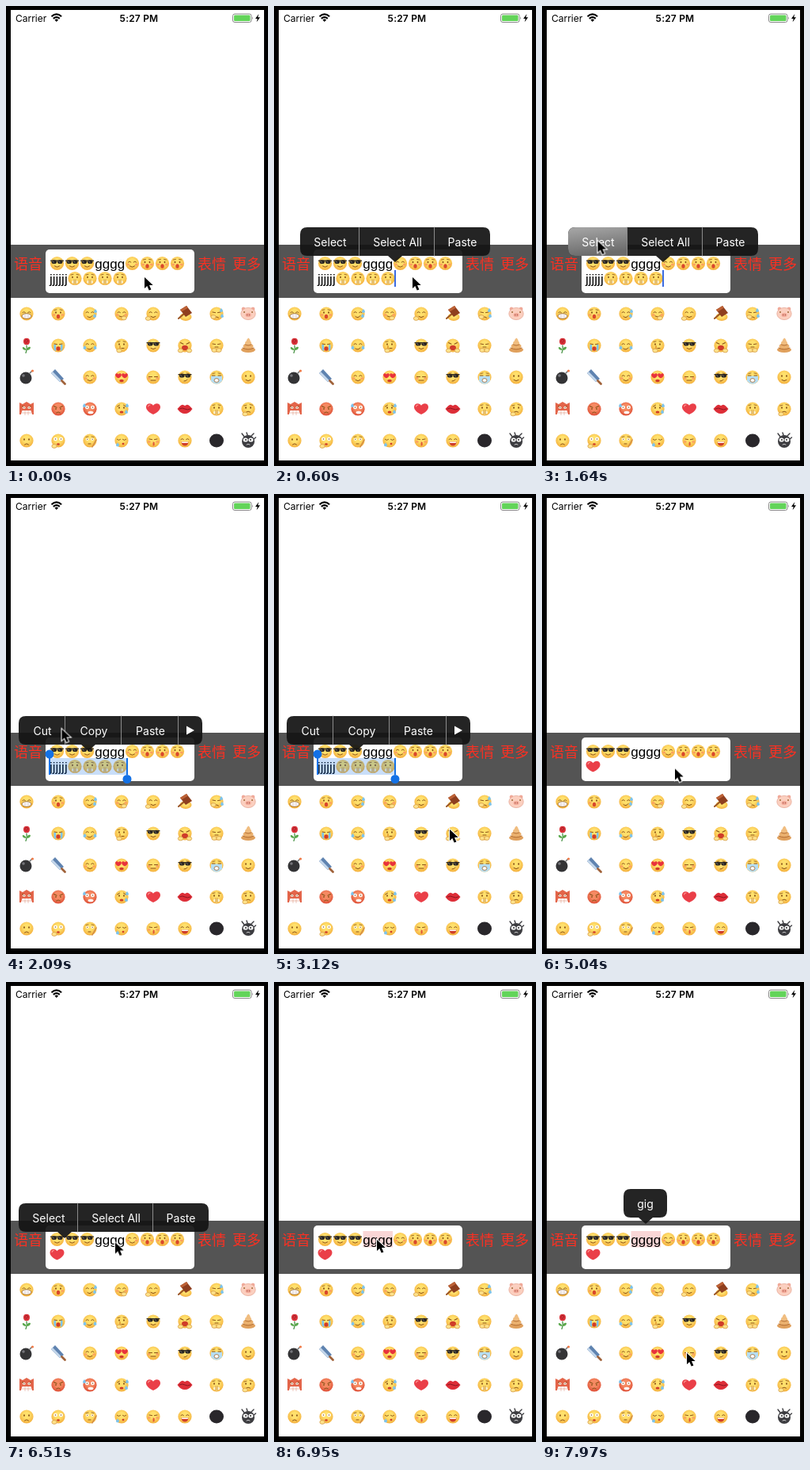
An HTML page for the animation above (8 s loop, 331x580 px).

```html
<!DOCTYPE html>
<html lang="zh-CN">
<head>
<meta charset="utf-8">
<title>Emoji keyboard</title>
<style>
html, body { margin: 0; width: 100%; height: 100%; overflow: hidden; background: #000; }
svg { display: block; width: 331px; height: 580px; }
text { font-family: Inter, Roboto, sans-serif; }
.ui { font-size: 12px; }
.typed { font: 17px "Liberation Sans", Arial, sans-serif; }
.tab { font: 300 18px "Noto Sans CJK SC", "Noto Sans CJK", sans-serif; fill: #fb3022; }
.menu text { font-size: 14px; fill: #fff; text-anchor: middle; }
.menu, .cut { opacity: 0; }

.cut { animation: 8s step-end infinite; }
#draft { opacity: 1; animation-name: draft; }
#reply { animation-name: reply; }
#edit { animation-name: edit; }
#press { animation-name: press; }
#select { animation-name: select; }
#clip { animation-name: clip; }
#again { animation-name: again; }
#mark { animation-name: mark; }
#hint { animation-name: hint; }
@keyframes draft { 0% { opacity: 1 } 45.25%, 100% { opacity: 0 } }
@keyframes reply { 0% { opacity: 0 } 45.25%, 100% { opacity: 1 } }
@keyframes edit { 0% { opacity: 0 } 6% { opacity: 1 } 24.25%, 100% { opacity: 0 } }
@keyframes press { 0% { opacity: 0 } 18.7% { opacity: 1 } 24.25%, 100% { opacity: 0 } }
@keyframes select { 0% { opacity: 0 } 24.25% { opacity: 1 } 45.25%, 100% { opacity: 0 } }
@keyframes clip { 0% { opacity: 0 } 26.1% { opacity: 1 } 45.25%, 100% { opacity: 0 } }
@keyframes again { 0% { opacity: 0 } 77.6% { opacity: 1 } 83.25%, 100% { opacity: 0 } }
@keyframes mark { 0% { opacity: 0 } 85%, 100% { opacity: 1 } }
@keyframes hint { 0% { opacity: 0 } 86.9%, 100% { opacity: 1 } }

#loupe { animation: loupe 8s linear infinite; transform-origin: 175px 343px; }
@keyframes loupe {
  0%, 1.8% { opacity: 0; transform: scale(.4) }
  2.2%, 4.9% { opacity: 1; transform: none }
  5.6%, 100% { opacity: 0; transform: scale(.4) }
}
#caret1 { animation: blink1 8s linear infinite; }
@keyframes blink1 {
  0%, 5.5% { opacity: 0 } 6%, 11% { opacity: 1 }
  12.5%, 15.5% { opacity: 0 } 17%, 24.2% { opacity: 1 } 24.25%, 100% { opacity: 0 }
}
#caret2 { animation: blink2 8s linear infinite; }
@keyframes blink2 {
  0%, 45.2% { opacity: 0 } 45.25%, 48% { opacity: 1 }
  49.5%, 52.5% { opacity: 0 } 53.5%, 57% { opacity: 1 }
  58.5%, 64.8% { opacity: 0 } 66%, 70.3% { opacity: 1 }
  72.2%, 75.5% { opacity: 0 } 76%, 79% { opacity: 1 } 81%, 100% { opacity: 0 }
}
#mouse { animation: mouse 8s linear infinite; }
@keyframes mouse {
  0%, 9.4% { transform: translate(175px, 342px) }
  14% { transform: translate(120px, 322px) }
  18.5%, 30% { transform: translate(70.5px, 296.5px) }
  33% { transform: translate(175px, 328px) }
  36.2% { transform: translate(256px, 385px) }
  39%, 40.6% { transform: translate(222px, 423px) }
  42.6%, 45.5% { transform: translate(187px, 517px) }
  53.5%, 57.5% { transform: translate(184px, 503.5px) }
  60.5% { transform: translate(176px, 415px) }
  63%, 64.8% { transform: translate(168px, 346.5px) }
  66.7%, 83.2% { transform: translate(138px, 328.5px) }
  85%, 92.3% { transform: translate(130px, 325px) }
  96% { transform: translate(160px, 395px) }
  99.6%, 100% { transform: translate(183px, 468px) }
}
</style>
</head>
<body>
<svg viewBox="0 0 331 580">
  <defs>
    <radialGradient id="skin" cy=".4" r=".62">
      <stop offset=".35" stop-color="#ffe06c"/><stop offset="1" stop-color="#f3ac3a"/>
    </radialGradient>
    <radialGradient id="rage" cy=".4" r=".62">
      <stop offset=".4" stop-color="#f58a62"/><stop offset="1" stop-color="#dc4a33"/>
    </radialGradient>
    <linearGradient id="down" x2=".25" y2="1">
      <stop offset=".1" stop-color="#a2a2a2"/><stop offset="1" stop-color="#6c6c6c"/>
    </linearGradient>
    <clipPath id="lens"><circle cx="175" cy="291" r="62"/></clipPath>
    <clipPath id="phone"><path d="M6 5h320v568H6z"/></clipPath>
  </defs>

  <g id="page">
    <path d="M6 5h320v568H6z" fill="#fff"/>
    <path d="M6 301h320v67H6z" fill="#545454"/>
    <rect x="50" y="307" width="188" height="55" rx="5" fill="#fff"/>
    <text class="tab" x="10" y="332">语音</text>
    <text class="tab" x="242" y="332">表情</text>
    <text class="tab" x="286" y="332">更多</text>
    <path id="mark" class="cut" d="M112.500 314h37.500v20.500h-37.500z" fill="#f9d6d6"/>
    <text class="typed" x="112.300" y="331">gggg</text>
    <g id="line"></g>
    <g id="draft" class="cut"><text class="typed" x="55" y="350">jjjjjj</text></g>
    <g id="reply" class="cut"></g>
    <g id="grid"></g>
  </g>

  <text class="ui" x="12" y="19.500">Carrier</text>
  <text class="ui" x="168" y="19.500" text-anchor="middle" font-weight="600" letter-spacing=".2">5:27 PM</text>
  <g fill="none" stroke="#000" stroke-width="2.100">
    <path d="M57.500 13.200q6.300-5.600 12.600 0M59.800 15.900q4-3.500 8 0"/>
    <path d="M61.500 17.500q2.300-2 4.600 0l-2.300 2.400z" fill="#000" stroke="none"/>
  </g>
  <rect x="286.500" y="10" width="23.500" height="10.500" rx="2.500" fill="none" stroke="#888"/>
  <rect x="288" y="11.500" width="20.500" height="7.500" rx="1.200" fill="#62d459"/>
  <path d="M311.200 13.500q1.800 1.700 0 3.500z" fill="#888"/>
  <path d="M319.300 10l-4.300 6h2.700l-1.100 4.300 4.400-6h-2.800z"/>

  <g id="select" class="cut" fill="#1371e6">
    <path d="M55 333h98v21H55z" opacity=".23"/>
    <path d="M54 333h2v21h-2zM152 333h2v21h-2z"/>
    <circle cx="55" cy="328" r="5.500"/><circle cx="153" cy="359.500" r="5.500"/>
  </g>
  <g fill="#3b6be0">
    <path id="caret1" d="M152 333h2v21h-2z"/>
    <path id="caret2" d="M73 333h2v21h-2z"/>
  </g>
  <g id="menus"></g>

  <g id="loupe">
    <circle cx="175" cy="291" r="63" fill="#fff" stroke="#aaa"/>
    <g clip-path="url(#lens)">
      <use href="#page" transform="translate(175 291) scale(1.25) translate(-175 -343)"/>
      <path d="M147.500 278h2.500v27h-2.500z" fill="#3b6be0"/>
    </g>
  </g>

  <g clip-path="url(#phone)">
    <path id="mouse" d="M0 0v14l3.300-3 2.400 5.600 2.700-1.100-2.400-5.400h4.700z" stroke="#fff" stroke-width="2" paint-order="stroke"/>
  </g>
</svg>

<script>
const ink = '#8a5218', blue = '#7cc4ee', red = '#d93a30', mouth = '#cf3d2a';
const oval = (x, y, rx, ry, fill, more = '') =>
  `<ellipse cx="${x}" cy="${y}" rx="${rx}" ry="${ry}" fill="${fill}" ${more}/>`;
const fill = (d, color) => `<path d="${d}" fill="${color}"/>`;
const line = (d, color = ink, w = 1) =>
  `<path d="${d}" fill="none" stroke="${color}" stroke-width="${w}" stroke-linecap="round"/>`;
const pair = (x, y, rx, ry, color) => oval(-x, y, rx, ry, color) + oval(x, y, rx, ry, color);

// Shared features
const skin = oval(0, 0, 8.6, 8.6, 'url(#skin)');
const rage = oval(0, 0, 8.6, 8.6, 'url(#rage)');
const dots = pair(3, -1.5, 0.9, 1.2, ink);
const arcs = line('M-5-1.500q1.700-2 3.400 0M1.600-1.500q1.700-2 3.400 0');
const shut = line('M-5-2l3.500 .6M5-2l-3.500 .6');
const brows = line('M-5-4.500l3-.6M5-4.500l-3-.6', ink, 0.8);
const scowl = line('M-5.500-3.500l3.500 1.700M5.500-3.500l-3.500 1.700', ink, 1.1);
const blush = pair(5.3, 1.5, 1.9, 1.2, '#fba060');
const smile = line('M-3 3.500q3 2.500 6 0');
const frown = line('M-2.500 5q2.500-2.500 5 0');
const laugh = fill('M-4.500 1.500h9q-.5 5-4.500 5t-4.500-5', mouth) + fill('M-4.200 1.500h8.400l-.5 1.400h-7.400z', '#fff');
const gape = oval(0, 3.5, 2.2, 2.8, '#d9482c');
const drop = (x, y) => fill(`M${x} ${y}q-4 4.500 0 5q4-.5 0-5`, blue);
const streams = fill('M-5.500-1h2.500v8q-2.500-.5-2.500-3zM5.500-1h-2.500v8q2.500-.5 2.500-3z', blue);
const hand = (x, y) => oval(x, y, 3.2, 2.4, '#ffe28a', 'stroke="#cf9440" stroke-width=".7"');
const shades = pair(3.7, -1.8, 3.3, 2.4, '#2b2620') + line('M-8-3.300h16', '#2b2620', 1.2)
  + line('M-5.500-2.500l1.500 1.200M2-2.500l1.500 1.200', '#8a8a8a', 0.8);
const heart = 'M0 7C-4 5.200-9 2-9-2.500-9-7.500-2-8.200 0-4.200 2-8.200 9-7.500 9-2.500 9 2 4 5.200 0 7z';
const mini = x => `<g transform="translate(${x} -1.800) scale(.43)">${fill(heart, '#e8323c')}</g>`;

const art = {
  grin: skin + arcs + oval(0, 3, 6, 3.2, '#fff', `stroke="${ink}" stroke-width=".8"`) + line('M-5.500 3h11M-2 .5v5M2 .5v5', '#cbb', 0.5),
  gasp: skin + brows + dots + blush + gape,
  phew: skin + arcs + line('M-3 3.500q3 3 6-1') + drop(7, -6) + drop(6, 0),
  giggle: skin + arcs + blush + line('M-3 3q3 2 6 0') + hand(3, 5.5),
  cheek: skin + arcs + smile + hand(-6.5, 6),
  hammer: oval(1, 4, 7.5, 5, 'url(#skin)') + line('M-8 6l7-6', '#9a5424', 2) + fill('M-6-5l8-5 7 9-8 5z', '#8f3f1f') + fill('M-6-5l8-5 2 2.500-8 5z', '#bd6236'),
  facepalm: skin + shut + frown + drop(6, -7) + drop(7, 0) + hand(-4, 4),
  pig: pair(6, -6, 2.4, 2.5, '#f0a898') + oval(0, 0, 9.2, 7.6, '#fbcfbf', 'stroke="#e8aa98" stroke-width=".8"') + pair(5, -2, 0.8, 1, ink) + oval(0, 1.5, 3.6, 2.6, '#f4ab9a') + pair(1.3, 1.5, 0.6, 0.9, '#a8574a'),
  rose: line('M0 0q1 5-1 9.500', '#388a35', 1.2) + fill('M0 6q-6 0-5-4 3 0 5 4q1-5 5-4 0 4-5 4', '#5aa84c') + oval(0, -5, 4, 4.2, '#d93138') + line('M-2-6q2-3 4 0q-2 4-4 1', '#9c1c26', 0.9),
  sob: skin + shut + streams + oval(0, 4, 2.6, 2.8, mouth),
  joy: skin + arcs + line('M-3 4q3 2.500 6-1') + drop(-6.5, 0) + drop(6.5, 0),
  ponder: skin + brows + dots + line('M0 3.500h3') + line('M-2 6v-5', '#e5a53c', 2) + hand(-3, 6.5),
  cool: skin + shades + smile,
  scream: skin + scowl + oval(0, 3, 4, 3.2, mouth) + hand(-5.5, 6.5) + hand(5.5, 6.5),
  hide: skin + shut + line('M-2 2h4') + hand(-3, 6) + hand(3, 6),
  swirl: oval(0, 5.5, 9, 3.4, '#e0a05c') + oval(0, 1, 6.5, 3.4, '#eab06e') + oval(0, -3, 4, 2.8, '#f0bd80') + fill('M-2.500-4q0-4 3-5.500 3 3 2 6z', '#f0bd80') + line('M-7 3q7 4 14 0M-4-1q4 2 8 0', '#b06a30', 0.9),
  bomb: oval(-1, 1, 7.5, 7.5, '#343436') + oval(-4, -2, 1.8, 1.8, '#75757a') + line('M4-5l3-3', '#777', 1.6) + oval(7.5, -8, 1.6, 1.6, '#f07a48'),
  knife: fill('M-9-5l5-5L7 2 2 6z', '#5f83b0') + fill('M-9-5l2-2L4 4.300 2 6z', '#c3d6ea') + line('M4.500 4.500l4 4', '#a0623a', 2.8),
  shy: skin + arcs + blush + smile,
  love: skin + mini(-4) + mini(4) + oval(0, 4.5, 2.8, 1.8, mouth),
  smug: skin + line('M-5.500-.5h4M1.500-.5h4') + blush + line('M-3 4h6'),
  suave: skin + brows + shades + line('M-1 5q3 0 4-2'),
  wail: skin + brows + fill('M-7-1.500h14v6q-3 4-7 4t-7-4z', '#b5def4') + line('M-5.500-2h3.500M2-2h3.500') + oval(0, 4, 3, 2.4, '#fff', `stroke="${ink}" stroke-width=".7"`),
  smile: skin + dots + smile,
  rant: fill('M-9-8l4 2 5-3 5 3 4-2v15H-9z', '#e3654a') + scowl + pair(3.2, -1.5, 1.8, 1.4, '#fff') + pair(3.2, -1.5, 0.7, 0.7, ink) + fill('M-5.500 2h11l2 6.500h-15z', '#fff') + line('M-5.500 5h11M-2 2.500v5M2 2.500v5', '#e09a88', 0.6),
  angry: rage + scowl + pair(3, 0, 0.9, 0.9, ink) + frown,
  crazy: rage + pair(3.5, -2, 2.4, 2.2, '#fff') + pair(3.5, -2, 0.8, 0.8, ink) + oval(1, 4.5, 3.5, 1.8, '#fff') + drop(-7, -7),
  worry: skin + line('M-5.500-3l3-1.800M5.500-3l-3-1.800') + dots + oval(0, 4, 2.4, 1.6, mouth) + drop(7, -7) + drop(6, 1),
  heart: fill(heart, '#ea3f48') + line('M-6.500-3q.5-2 2.500-2', '#ff9a96', 1.1),
  lips: fill('M-9.500 0q5-6 7.500-5l2 1 2-1q2.500-1 7.500 5-4 6-9.500 6T-9.500 0', '#dd2e38') + line('M-7 0q4-2 7 0t7 0', '#8c1720', 1),
  shush: skin + brows + dots + oval(0, 4.5, 4, 2.2, '#fff3cc') + line('M0 1.500v6', '#f6cb6a', 1.8) + line('M-1.200 1.500v5M1.200 1.500v5', '#b87f2c', 0.6),
  doubt: skin + line('M-5.500-4l3.500-.8M2-5.500l3.500 .8', ink, 0.8) + dots + line('M-2.500 4q2.500-2 5 0') + hand(-4, 6.5),
  sad: skin + dots + frown,
  dizzy: skin + pair(3.5, -2, 2.4, 2.2, '#fff') + pair(3.5, -2, 0.8, 0.8, ink) + oval(0, 4.5, 1.8, 1.2, mouth) + hand(-5, 7),
  nibble: skin + brows + pair(3.2, -1.8, 1.8, 1.5, '#fff') + pair(3.2, -1.8, 0.7, 0.7, ink) + line('M-2 4h3') + line('M3 8l5-9', '#d08a44', 1.5),
  sleep: skin + line('M-5.500-1.500q2 2 4 0M1.500-1.500q2 2 4 0') + oval(2, 4, 1.4, 1.2, mouth) + drop(-5, 2.5),
  kiss: skin + shut + blush + line('M0 2q2.500 1 0 2q2.500 1 0 2', red, 1.1),
  haha: skin + arcs + laugh,
  couple: oval(0, 0, 9, 8.5, '#29272b'),
  zapped: line('M-5-5l-3-4M-1-7l-1-3M4-6l3-3M7-2l2.500-2', '#3c3c40', 1.4) + oval(0, 1, 8, 8, '#3c3c40') + pair(3.4, -1, 3, 2.6, '#fff') + pair(3, -1, 0.9, 0.9, '#111') + line('M-2 5q2-1.500 4 0', '#ddd', 0.9)
};

const put = (name, x, y) => `<g transform="translate(${x} ${y})">${art[name]}</g>`;
const byId = id => document.getElementById(id);

byId('grid').innerHTML = Object.keys(art)
  .map((name, i) => put(name, 26 + i % 8 * 40, 388 + Math.floor(i / 8) * 40)).join('');

const row = (names, x, y) => names.map((name, i) => put(name, x + i * 19, y)).join('');
byId('line').innerHTML = row(['cool', 'cool', 'cool'], 64.5, 324.5)
  + row(['shy', 'gasp', 'gasp', 'gasp'], 159.5, 324.5);
byId('draft').innerHTML += row(Array(4).fill('shush'), 87, 343.5);
byId('reply').innerHTML = put('heart', 64.5, 343.5);

// Callout bubble with its arrow tip at x = tip
function menu(id, x, y, w, tip, labels, rules = [], extra = '') {
  const texts = labels.map(([s, cx]) => `<text x="${cx}" y="${y + 23.5}">${s}</text>`).join('');
  const bars = rules.map(rx => line(`M${rx} ${y}v36`, '#8b8b8b', 1)).join('');
  const body = `M${x + 9} ${y}h${w - 18}q9 0 9 9v18q0 9-9 9H${tip + 9}l-9 8-9-8H${x + 9}q-9 0-9-9v-18q0-9 9-9z`;
  return `<g id="${id}" class="cut menu"><path d="${body}" fill="#141414" fill-opacity=".93"/>${extra}${bars}${texts}</g>`;
}
const pressed = '<path id="press" class="cut" d="M42 279h65.500v36H42q-9 0-9-9v-18q0-9 9-9z" fill="url(#down)"/>';

byId('menus').innerHTML =
  menu('edit', 33, 279, 240, 153, [['Select', 71], ['Select All', 156], ['Paste', 238]], [107.5, 202.5], pressed)
  + menu('clip', 16, 280, 232, 104, [['Cut', 46], ['Copy', 111], ['Paste', 182.5]], [74.5, 145.5, 217.5], fill('M228 292.500v11l10-5.500z', '#fff'))
  + menu('again', 16, 279, 240, 74, [['Select', 54], ['Select All', 139], ['Paste', 221]], [90.5, 185.5])
  + menu('hint', 103, 261, 55, 131, [['gig', 130.5]]);
</script>
</body>
</html>
```
